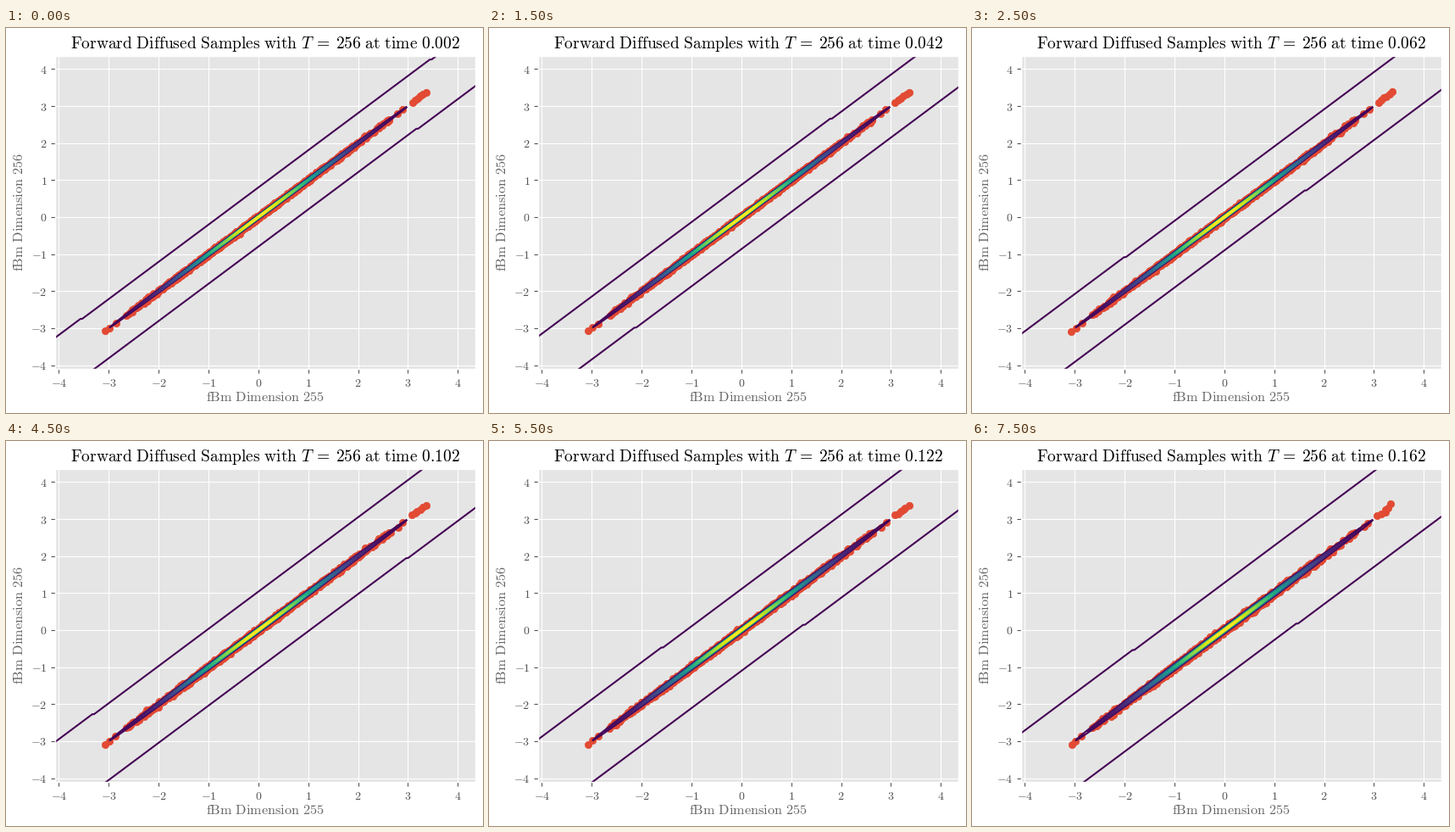
These frames come from a looping animation (563x454 px, 8000 ms). A matplotlib script:

```python
import numpy as np
import matplotlib.pyplot as plt
from matplotlib.animation import FuncAnimation
from matplotlib.collections import LineCollection

W, H, DPI = 563, 454, 100
LEFT, TOP, AX_W, AX_H = 58.1, 32.7, 496.0, 369.6
X_LIM = (-4.074, 4.355)
Y_LIM = (-4.11, 4.36)

LEVELS = np.arange(1, 91) / 91
UNDERFLOW = 38.6  # sigmas at which the density becomes zero
START_OFFSET = 0.8
TIP = 2.98
GRID = 250

plt.style.use("ggplot")
plt.rcParams["mathtext.fontset"] = "cm"

rng = np.random.default_rng(4)
bulk = rng.normal(0, 1, 1500)
bulk = bulk[np.abs(bulk) < 2.68]
tails = np.append([-3.07, -2.98, -2.86, 2.79, 2.9], np.linspace(3.09, 3.36, 6))
base_x = np.append(bulk, tails)
base_y = np.append(bulk + rng.normal(0, START_OFFSET / UNDERFLOW, bulk.size), tails * 1.004)


def tex(words):
    return r"\mathrm{" + words.replace(" ", r"\ ") + "}"


def zero_offset(t):
    """Distance of the zero contour from the diagonal; it grows with the noise."""
    s = t - 0.002
    return np.sqrt(START_OFFSET**2 + 1.21 * s + 31.9 * s * s)


def samples(step, offset):
    noise = np.sqrt((offset**2 - START_OFFSET**2) / 2) / UNDERFLOW
    jitter = np.random.default_rng(50 + step).normal(0, noise, (base_x.size, 2))
    return np.column_stack([base_x, base_y]) + jitter


def ellipses(sigma):
    a = np.linspace(0, 2 * np.pi, 241)
    radii = np.sqrt(-2 * np.log(LEVELS))
    along, across = np.cos(a) * TIP / radii[0], np.sin(a) * sigma / 2
    shape = np.column_stack([along - across, along + across])
    return [shape * r for r in radii]


def edge_line(offset):
    """Diagonal snapped to the density grid, which gives it its small jogs."""
    x = np.linspace(*X_LIM, GRID)
    cell = (Y_LIM[1] - Y_LIM[0]) / (GRID - 1)
    return x, Y_LIM[0] + cell * np.round((x + offset - Y_LIM[0]) / cell)


fig = plt.figure(figsize=(W / DPI, H / DPI), dpi=DPI)
ax = fig.add_axes([LEFT / W, 1 - (TOP + AX_H) / H, AX_W / W, AX_H / H])
for axis in (ax.xaxis, ax.yaxis):
    axis.set_ticks(range(-4, 5), [f"${v}$" for v in range(-4, 5)])


def axis_name(x, y, words, **kw):
    fig.text(x / W, 1 - y / H, f"${tex(words)}$", size=11.7, color="#666666",
             ha="center", va="center", **kw)


axis_name(305.5, 435, "fBm Dimension 255")
axis_name(15.5, 216.8, "fBm Dimension 256", rotation=90)
title = ax.set_title("", fontsize=14.03)

dots = ax.scatter(base_x, base_y, color="#E24A33")
density = LineCollection([], cmap="viridis", array=LEVELS, linewidths=1.5, zorder=2)
density.set_clim(0, LEVELS[-1])
ax.add_collection(density)
upper, lower = (ax.plot([], [], color="#440154", lw=1.5)[0] for _ in range(2))
ax.set_xlim(X_LIM)
ax.set_ylim(Y_LIM)


def draw(i):
    step = (i + 1) // 2
    t = 0.002 + 0.02 * step
    offset = zero_offset(t)
    dots.set_offsets(samples(step, offset))
    density.set_segments(ellipses(offset / UNDERFLOW))
    upper.set_data(*edge_line(offset))
    lower.set_data(*edge_line(-offset))
    title.set_text(f"${tex('Forward Diffused Samples with ')}T" r"\:=\:256"
                   f"{tex(f' at time {t:.3f}')}$")
    return dots, density, upper, lower, title


anim = FuncAnimation(fig, draw, frames=16, interval=500, repeat=True, repeat_delay=0)
plt.show()
```
